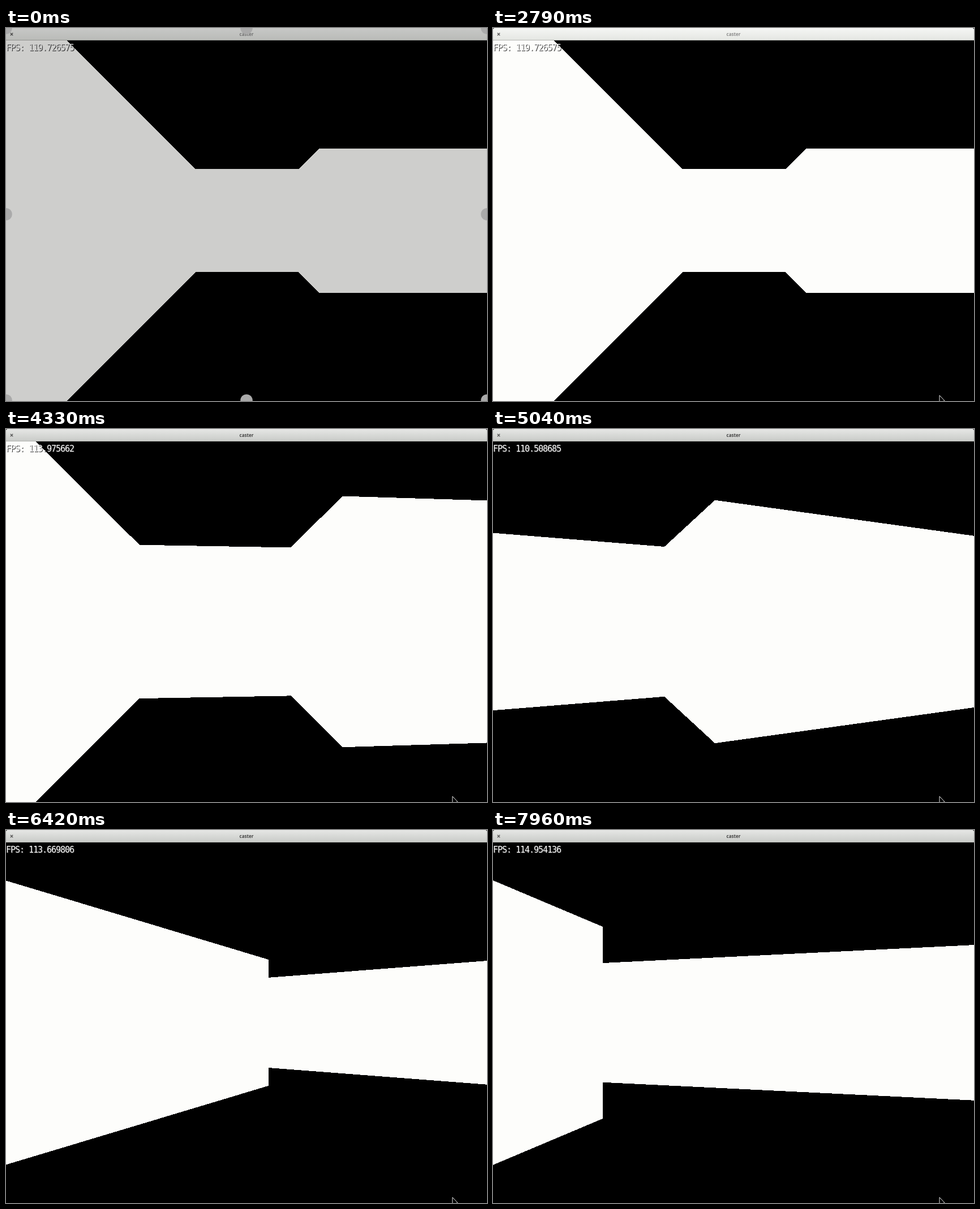
Animation of 850x659 px, one loop 8000 ms. Source, as an HTML page:

```html
<!DOCTYPE html>
<html lang="en">
<head>
<meta charset="utf-8">
<title>caster</title>
<style>
  html, body { margin: 0; width: 100%; height: 100%; overflow: hidden; background: #000; }
  svg { display: block; width: 850px; height: 659px; }
  .fps { font: 15px "DejaVu Sans Mono", monospace; letter-spacing: -1.03px; white-space: pre; }
  .title { font: bold 8px "Open Sans", sans-serif; text-anchor: middle; }
</style>
</head>
<body>
<svg viewBox="0 0 850 659">
  <defs>
    <linearGradient id="idle" x2="0" y2="1">
      <stop stop-color="#f5f6f4"/><stop offset="1" stop-color="#e4e6e2"/>
    </linearGradient>
    <linearGradient id="active" x2="0" y2="1">
      <stop stop-color="#e6e7e5"/><stop offset="1" stop-color="#c8cac7"/>
    </linearGradient>
  </defs>
  <rect width="850" height="659"/>
  <path id="walls" fill="#fdfdfb" shape-rendering="crispEdges"/>
  <text class="fps" x="1" y="40.5" fill="#333"></text>
  <text class="fps" x="0" y="39.5" fill="#fff"></text>
  <path id="bar" d="M0 22V3Q0 0 3 0H847Q850 0 850 3V22Z"/>
  <path d="M0 21.5H850" stroke="#b4b6b2"/>
  <g id="label">
    <text class="title" x="425" y="13.5">caster</text>
    <path d="M7.8 8.8l4.4 4.4m0-4.4l-4.4 4.4" stroke="#555" stroke-width="1.3"/>
  </g>
  <path id="cursor" d="M789 649V662L798 658.5Z" fill="#000" stroke="#e8e8e8"/>
  <g id="veil">
    <rect width="850" height="659" opacity=".19"/>
    <g id="knobs" fill="#aaa"></g>
  </g>
</svg>
<script>
const $ = id => document.getElementById(id);
const LOOP = 8000, FPS = 24;
const W = 850, TOP = 22, BOTTOM = 659;
const CX = 426, CY = 340.4, FOCAL = 637.5;
const WALK = 3080, APPEAR = 2100, FADE = 250;
const TURN_START = 4141, TURN_RATE = 25.2, TURN_MAX = 75.1;

// Outline of the corridor seen from above, as x, z corners
const WALLS = [[-.5, -2], [-.5, 3.5], [.5, 3.5], [.5, 2.5], [2.5, 2.5], [2.5, 5], [3.5, 5], [3.5, -4]];

const clamp = (v, lo, hi) => Math.min(hi, Math.max(lo, v));
const ramp = (t, from, to) => clamp((t - from) / (to - from), 0, 1);

for (let i = 0; i < 9; i++) {
  if (i === 4) continue;
  const x = i % 3 * W / 2, y = Math.floor(i / 3) * 329;
  $("knobs").innerHTML += `<circle cx="${x}" cy="${y}" r="10.8"/>`;
}

// Walk ahead, turn right, walk on
function poseAt(t) {
  const first = ramp(t, WALK, 4080), second = ramp(t, 7121, 7958);
  const deg = clamp((t - TURN_START) / 1000 * TURN_RATE, 0, TURN_MAX);
  return { px: .86 * second, pz: 1.1 * first + .255 * second, angle: deg * Math.PI / 180 };
}

function castDepth(px, pz, dx, dz) {
  let best = 1e3;
  for (let i = 1; i < WALLS.length; i++) {
    const [x1, z1] = WALLS[i - 1], [x2, z2] = WALLS[i];
    const along = x1 === x2;
    const d = along ? (x1 - px) / dx : (z1 - pz) / dz;
    const hit = along ? pz + dz * d : px + dx * d;
    const [a, b] = along ? [z1, z2] : [x1, x2];
    if (d > .01 && d < best && (hit - a) * (hit - b) <= 0) best = d;
  }
  return best;
}

function wallPath({ px, pz, angle }) {
  const s = Math.sin(angle), c = Math.cos(angle);
  let upper = "", lower = "";
  for (let x = 0; x < W; x++) {
    const k = (x + .5 - CX) / FOCAL;
    const h = FOCAL / 2 / castDepth(px, pz, s + c * k, c - s * k);
    const y1 = Math.max(TOP, Math.round(CY - h));
    const y2 = Math.min(BOTTOM, Math.round(CY + h));
    upper += `L${x} ${y1}H${x + 1}`;
    lower = `L${x + 1} ${y2}H${x}` + lower;
  }
  return "M" + upper.slice(1) + lower + "Z";
}

// The rate dips while turning, then recovers
function reading(t) {
  if (t < WALK) return 119.726575;
  const [from, to, a, b] =
    t < 5791 ? [4333, 5791, 113.977294, 106.84103] :
    t < 6416 ? [5791, 6416, 106.84103, 113.66925] :
               [6416, 7958, 113.66925, 114.954136];
  return a + (b - a) * ramp(t, from, to);
}

function draw(t) {
  const now = Math.floor((t + 5) * FPS / 1000) * 1000 / FPS % LOOP;
  const active = now >= WALK;
  $("walls").setAttribute("d", wallPath(poseAt(now)));
  const label = "FPS: " + reading(now).toFixed(6);
  document.querySelectorAll(".fps").forEach(e => e.textContent = label);
  $("bar").setAttribute("fill", active ? "url(#active)" : "url(#idle)");
  $("label").setAttribute("fill", active ? "#444" : "#8c8c8c");
  $("cursor").style.display = now >= APPEAR ? "" : "none";
  $("veil").setAttribute("opacity", 1 - ramp(now, 0, FADE));
}

const start = performance.now();
function tick() {
  draw((performance.now() - start) % LOOP);
  requestAnimationFrame(tick);
}
tick();
</script>
</body>
</html>
```
